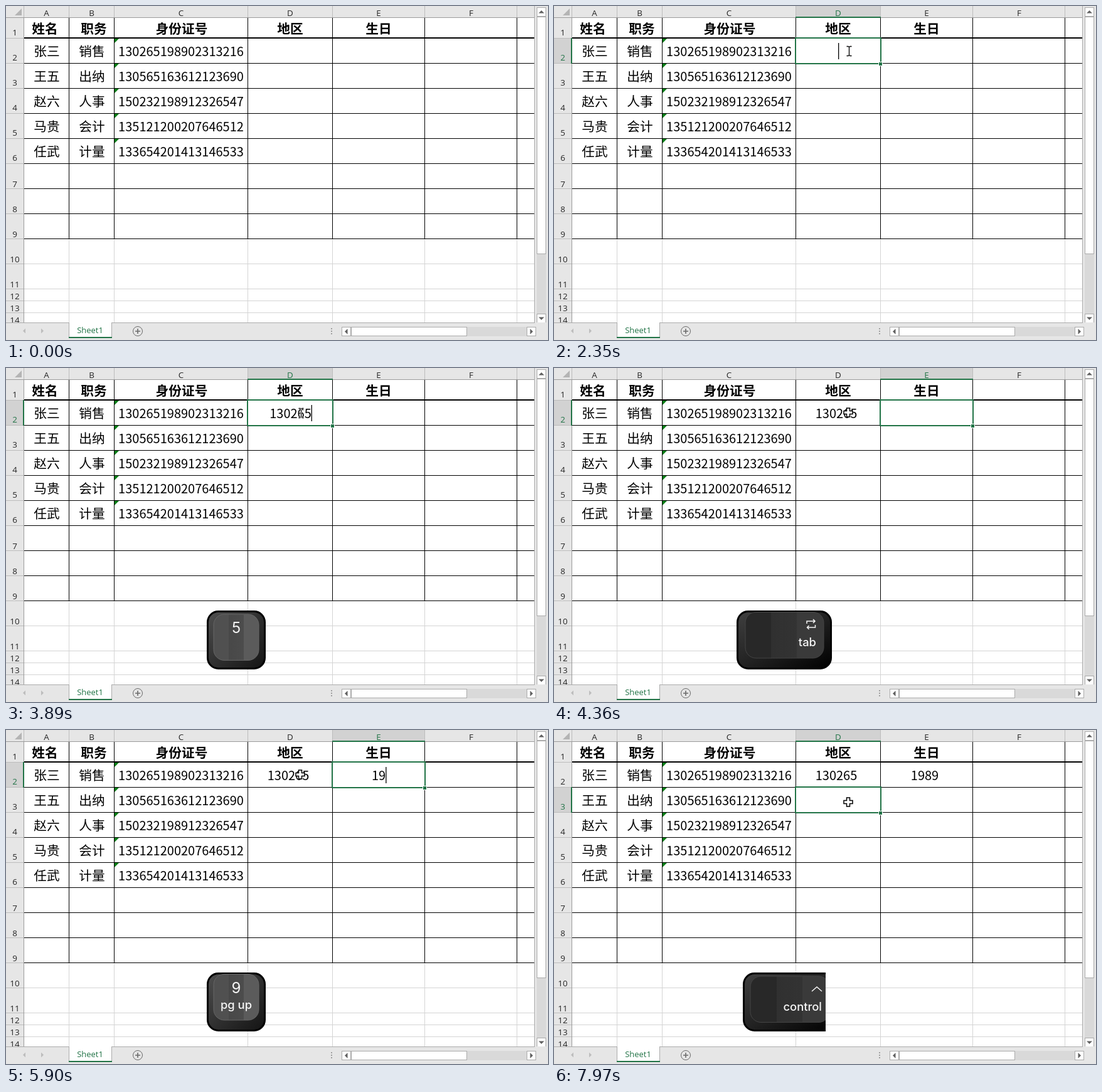
An HTML page for the animation above (8 s loop, 864x533 px).

```html
<!DOCTYPE html>
<html lang="zh-CN">
<head>
<meta charset="utf-8">
<style>
  html, body { margin: 0; width: 100%; height: 100%; overflow: hidden; background: #fff; }
  svg { display: block; }
  text { text-anchor: middle; white-space: pre; }
  .ui { font: 13.4px "Open Sans", "Noto Sans", sans-serif; fill: #262626; }
  .cell { font: 300 20px "Noto Sans CJK SC", "Noto Sans CJK", sans-serif; fill: #000; }
  .han { font-size: 20.7px; }
  .bold { font-weight: 700; }
  .key { font: 500 18.4px Inter, sans-serif; fill: #f6f6f6; }
  .digit { font-size: 24px; font-weight: 400; }
  .end { text-anchor: end; }
</style>
</head>
<body>
<svg id="stage" width="864" height="533" viewBox="0 0 864 533">
  <defs>
    <linearGradient id="base" x2="1" y2="1">
      <stop stop-color="#505050"/><stop offset=".5" stop-color="#303030"/><stop offset="1" stop-color="#141414"/>
    </linearGradient>
    <linearGradient id="darkBase" x2="1" y2="1">
      <stop stop-color="#404040"/><stop offset=".5" stop-color="#222"/><stop offset="1" stop-color="#000"/>
    </linearGradient>
    <linearGradient id="cap">
      <stop offset=".33" stop-color="#505050"/><stop offset=".33" stop-color="#484848"/>
      <stop offset=".66" stop-color="#4c4c4c"/><stop offset=".66" stop-color="#5b5b5b"/>
    </linearGradient>
    <linearGradient id="darkCap">
      <stop offset=".33" stop-color="#282828"/><stop offset=".33" stop-color="#303030"/>
      <stop offset=".66" stop-color="#333"/><stop offset=".66" stop-color="#3a3a3a"/>
    </linearGradient>
    <clipPath id="sheetClip"><rect width="843" height="505"/></clipPath>
    <clipPath id="wideClip"><rect x="290" y="380" width="143" height="110"/></clipPath>
  </defs>
</svg>
<script>
const NS = 'http://www.w3.org/2000/svg';
const stage = document.getElementById('stage');
const GREEN = '#217346';
const LOOP = 8000;

function add(parent, tag, attrs, content) {
  const el = document.createElementNS(NS, tag);
  for (const k in attrs) el.setAttribute(k, attrs[k]);
  if (content !== undefined) el.textContent = content;
  return parent.appendChild(el);
}
const box = (p, x, y, width, height, fill, more) => add(p, 'rect', { x, y, width, height, fill, ...more });
const label = (p, x, y, cls, content, more) => add(p, 'text', { x, y, class: cls, ...more }, content);
const path = (p, d, more) => add(p, 'path', { d, fill: 'none', ...more });
const set = (el, attrs) => { for (const k in attrs) el.setAttribute(k, attrs[k]); };
const show = (el, on) => el.setAttribute('visibility', on ? 'visible' : 'hidden');
const clamp = v => Math.max(0, Math.min(1, v));

// Sheet geometry: the right and bottom line of each column and row
const cols = [28, 100, 172, 385, 520, 667, 814];
const rows = [18, 51, 91, 131, 171, 211, 251, 291, 331, 371, 411, 451, 470, 489, 508];
const mid = i => (cols[i] + cols[i + 1] + 1) / 2;
const rowLabelY = i => rows[i] - (i < 7 ? 4 : 2);

const sheet = add(stage, 'g', { 'clip-path': 'url(#sheetClip)' });
box(sheet, 0, 0, 843, 505, '#fff');
cols.slice(1).forEach(x => box(sheet, x, 372, 1, 133, '#d4d4d4'));
rows.slice(10).forEach(y => box(sheet, 29, y, 814, 1, '#d4d4d4'));
cols.slice(1).forEach(x => box(sheet, x, 19, 1, 353, '#000'));
rows.slice(2, 10).forEach(y => box(sheet, 29, y, 814, 1, '#000'));
box(sheet, 29, 50, 814, 2, '#000');

box(sheet, 0, 0, 843, 18, '#e6e6e6');
box(sheet, 0, 0, 28, 505, '#e6e6e6');
const headFill = box(sheet, 0, 0, 0, 18, '#d2d2d2');
const sideFill = box(sheet, 0, 0, 28, 0, '#d2d2d2');
cols.forEach(x => box(sheet, x, 0, 1, 18, '#bcbcbc'));
rows.forEach(y => box(sheet, 0, y, 28, 1, '#bcbcbc'));
box(sheet, 0, 18, 843, 1, '#9b9b9b');
box(sheet, 28, 18, 1, 487, '#9b9b9b');
path(sheet, 'M25 4V15H14Z', { style: 'fill:#b4b4b4' });
const headLine = box(sheet, 0, 17, 0, 2, GREEN);
const sideLine = box(sheet, 27, 0, 2, 0, GREEN);
const heads = [...'ABCDEF'].map((c, i) => label(sheet, i < 5 ? mid(i) : 741.5, 15.5, 'ui', c));
const sides = rows.slice(1).map((y, i) => label(sheet, 14, rowLabelY(i + 1), 'ui', i + 1));

[['姓名', 62], ['职务', 140], ['身份证号', 280], ['地区', 453], ['生日', 594]]
  .forEach(([s, x]) => label(sheet, x, 44, 'cell han bold', s));
[
  ['张三', '销售', '130265198902313216'],
  ['王五', '出纳', '130565163612123690'],
  ['赵六', '人事', '150232198912326547'],
  ['马贵', '会计', '135121200207646512'],
  ['任武', '计量', '133654201413146533'],
].forEach(([name, job, id], i) => {
  const y = 80 + i * 40;
  label(sheet, 65, y, 'cell han', name);
  label(sheet, 137, y, 'cell han', job);
  label(sheet, 279, y, 'cell', id);
  path(sheet, `M173 ${y - 28}h7l-7 7z`, { style: 'fill:#0a7d16' });
});

// Typed values, selection frame and caret
const region = label(sheet, 450, 80, 'cell', '');
const birth = label(sheet, 591, 80, 'cell', '');
const frame = add(sheet, 'rect', { fill: 'none', stroke: GREEN, 'stroke-width': 2 });
const handle = box(sheet, 0, 0, 6, 6, GREEN, { stroke: '#fff' });
const caret = box(sheet, 0, 59, 1.3, 26, '#000');

// Scroll bars and sheet tab
function button(x, y, w, h, arrow) {
  box(stage, x + .5, y + .5, w, h, '#fff', { stroke: '#ababab' });
  if (arrow) path(stage, arrow, { style: 'fill:#606060' });
}
box(stage, 842, 0, 22, 533, '#e6e6e6');
box(stage, 842, 0, 1, 505, '#ababab');
box(stage, 846, 17, 15, 475, '#d9d9d9');
button(846, 2, 14, 14, 'M849 11.5h9l-4.500-4.500z');
button(846, 17, 14, 378);
button(846, 491, 14, 14, 'M849 496.500h9l-4.500 4.500z');
box(stage, 0, 505, 864, 28, '#e6e6e6');
box(stage, 0, 505, 843, 1, '#ababab');
path(stage, 'M31 514.500v8l-4-4zM56 514.500v8l4-4z', { style: 'fill:#bdbdbd' });
box(stage, 100, 505, 69, 24, '#fff');
box(stage, 100, 505, 1, 25, '#ababab');
box(stage, 168, 505, 1, 25, '#ababab');
box(stage, 100, 528, 69, 2, GREEN);
label(stage, 134, 522, 'ui', 'Sheet1', { style: `font-size:13px;fill:${GREEN}` });
add(stage, 'circle', { cx: 210, cy: 519, r: 7.5, fill: 'none', stroke: '#6a6a6a' });
path(stage, 'M206 519h8M210 515v8', { stroke: '#6a6a6a', 'stroke-width': 1.6 });
[514, 518, 522].forEach(y => box(stage, 518, y, 2, 2, '#a0a0a0'));
box(stage, 535, 512, 310, 15, '#d9d9d9');
button(535, 512, 14, 14, 'M544.500 515v9l-4.500-4.500z');
button(550, 512, 184, 14);
button(830, 512, 14, 14, 'M835.500 515v9l4.500-4.500z');

// Keyboard keys
function makeKey(x, width, capX, capWidth, dark = false) {
  const g = add(stage, 'g', {});
  const pre = dark ? 'darkB' : 'b';
  add(g, 'rect', { x: x + 1.5, y: 388.5, width: width - 3, height: 91, rx: 17,
    fill: `url(#${pre}ase)`, stroke: '#000', 'stroke-width': 3 });
  const cap = add(g, 'g', {});
  add(cap, 'rect', { x: capX, y: 389.5, width: capWidth, height: 73.5, rx: 17,
    fill: `url(#${dark ? 'darkCap' : 'cap'})`, stroke: dark ? '#444' : '#666', 'stroke-width': 1 });
  return { g, cap };
}
const numKey = makeKey(320, 94, 331, 72);
const digit = label(numKey.cap, 367, 419.5, 'key digit', '');
const sub = label(numKey.cap, 367, 445, 'key', '');
const line = { stroke: '#f6f6f6', 'stroke-width': 1.5 };

const tabKey = makeKey(291, 152, 305, 125, true);
label(tabKey.cap, 418, 444, 'key end', 'tab');
path(tabKey.cap, 'M403 408v-4h13M413 401l3 3-3 3M416.500 410v4h-13M406.500 411l-3 3 3 3', line);

const ctrlKey = makeKey(301, 151, 313, 126, true);
ctrlKey.g.setAttribute('clip-path', 'url(#wideClip)');
label(ctrlKey.cap, 427, 444, 'key end', 'control');
path(ctrlKey.cap, 'M411 413.500l8-7 8 7', line);

const allKeys = [numKey, tabKey, ctrlKey];
// press time, key, digit, second legend
const presses = [
  [2440, numKey, 1, 'end'], [2690, numKey, 3, 'pg dn'], [2960, numKey, 0, 'ins'],
  [3420, numKey, 2, '↓'], [3640, numKey, 6, '→'], [3850, numKey, 5, ''],
  [4200, tabKey],
  [5540, numKey, 1, 'end'], [5905, numKey, 9, 'pg up'],
  [6240, numKey, 8, '↑'], [6490, numKey, 9, 'pg up'],
  [7925, ctrlKey],
];

// Mouse pointers
const cross = path(stage, 'M-2.500-7h5v4.500h4.500v5h-4.500v4.500h-5v-4.500h-4.500v-5h4.500z',
  { style: 'fill:#fff', stroke: '#000', 'stroke-width': 1.5 });
const beam = path(stage, 'M466.500 64.500h2.500l1.500 1 1.500-1h2.500M470.500 65v14M466.500 79.500h2.500l1.500-1 1.500 1h2.500',
  { stroke: '#fff', 'stroke-width': 1.3, style: 'mix-blend-mode:difference' });

const pointer = [[270, 442, 90], [390, 472, 44], [510, 469, 71], [6860, 469, 71],
  [7250, 432, 115], [7510, 432, 115], [7680, 469, 115]];
const regionTimes = [2450, 2700, 2930, 3400, 3620, 3840];
const birthTimes = [5510, 5730, 6210, 6400];
const caretTimes = [[860, 1420], [1920, 4220], [5500, 6870], [7400, 7720]];

const typed = (s, times, t) => s.slice(0, times.filter(x => x <= t).length);

function track(points, t) {
  let i = 0;
  while (i < points.length - 2 && t > points[i + 1][0]) i++;
  const [t0, x0, y0] = points[i], [t1, x1, y1] = points[i + 1];
  const k = clamp((t - t0) / (t1 - t0)), e = k * k * (3 - 2 * k);
  return [x0 + (x1 - x0) * e, y0 + (y1 - y0) * e];
}

function select(col, row) {
  const on = col >= 0;
  [headFill, headLine, sideFill, sideLine, frame, handle].forEach(el => show(el, on));
  heads.forEach((el, i) => el.style.fill = i === col ? GREEN : '');
  sides.forEach((el, i) => el.style.fill = i === row ? GREEN : '');
  if (!on) return;
  const x = cols[col], y = rows[row], w = cols[col + 1] - x + 1, h = rows[row + 1] - y + 1;
  set(headFill, { x: x + 1, width: w - 2 });
  set(headLine, { x, width: w });
  set(sideFill, { y: y + 1, height: h - 2 });
  set(sideLine, { y, height: h });
  set(frame, { x, y, width: w, height: h });
  set(handle, { x: x + w - 3.5, y: y + h - 2.5 });
}

function drawKeys(t) {
  const now = presses.filter(p => t >= p[0] - 70).pop();
  allKeys.forEach(k => show(k.g, now && now[1] === k));
  if (!now) return;
  const [start, key, d, legend] = now;
  const drop = 3.5 * clamp(Math.min((t - start) / 40, (150 - t + start) / 40));
  key.cap.setAttribute('transform', `translate(0 ${drop})`);
  key.g.setAttribute('opacity', clamp((t - 2350) / 90));
  if (key === numKey) {
    digit.textContent = d;
    sub.textContent = legend;
  }
}

function draw(t) {
  if (t < 670) select(-1, -1);
  else if (t < 4250) select(3, 1);
  else if (t < 7720) select(4, 1);
  else select(3, 2);

  const a = typed('130265', regionTimes, t), b = typed('1989', birthTimes, t);
  region.textContent = a;
  birth.textContent = b;
  region.setAttribute('x', t < 4250 ? 453.5 : 450);
  birth.setAttribute('x', t < 7720 ? 594 : 591);

  const inRegion = t < 4250;
  show(caret, caretTimes.some(([from, to]) => t >= from && t < to));
  caret.setAttribute('x', inRegion ? 453 + a.length * 5.6 : 594 + b.length * 5.6);

  const editing = t >= 780 && t < 4300;
  const [x, y] = track(pointer, t);
  show(cross, t >= 270 && !editing);
  show(beam, editing);
  cross.setAttribute('transform', `translate(${x} ${y})`);
  drawKeys(t);
}

const begin = performance.now();
function tick() {
  draw((performance.now() - begin) % LOOP);
  requestAnimationFrame(tick);
}
tick();
</script>
</body>
</html>
```
